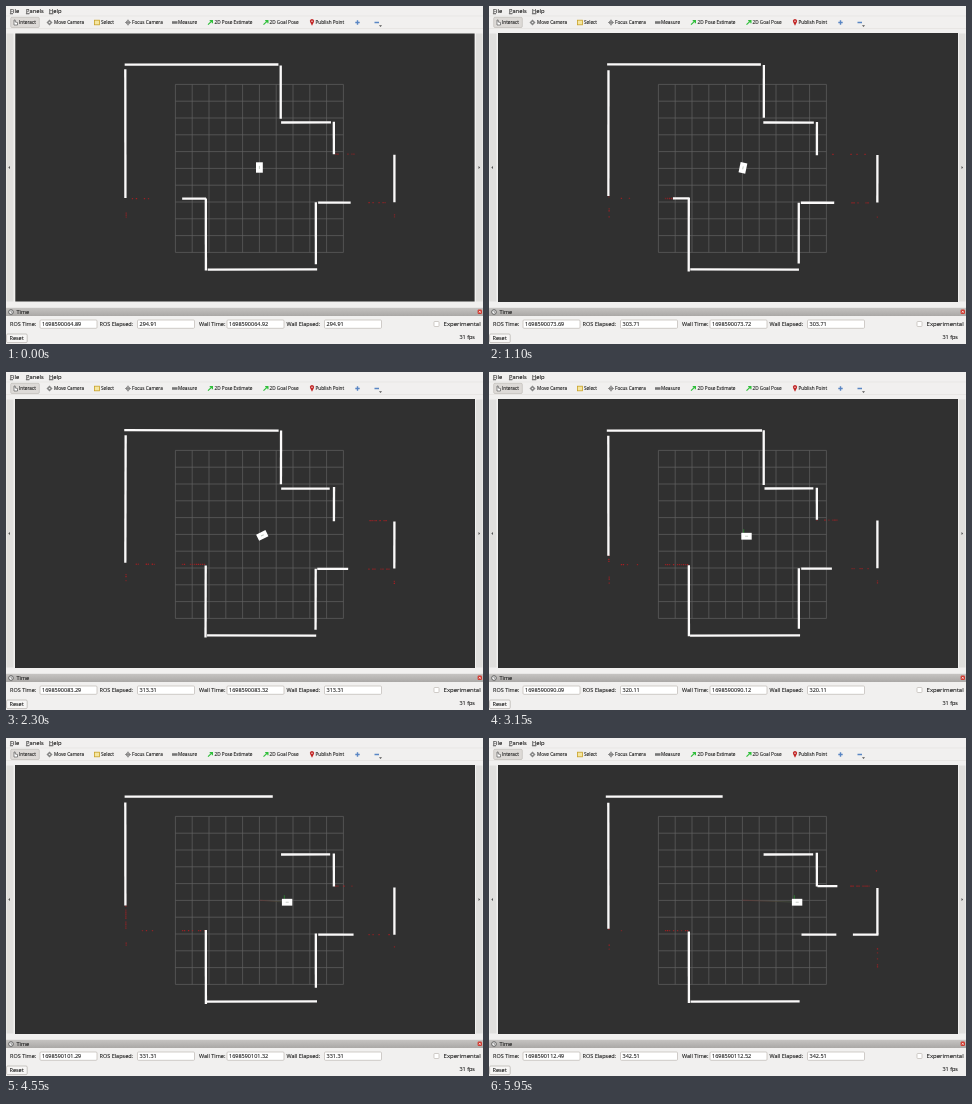
Write an HTML page with a canvas that moves like this. It is 477 by 338 pixels and loops after 6 s.

```html
<!DOCTYPE html>
<html lang="en">
<head>
<meta charset="utf-8">
<title>Robot view</title>
<style>
html, body { margin: 0; width: 477px; height: 338px; overflow: hidden; background: #f1f0ef; }
svg, canvas { position: absolute; left: 0; top: 0; width: 477px; height: 338px; display: block; }
text { font: 5.5px "Open Sans", "Noto Sans", sans-serif; fill: #1c1c1c; stroke: #1c1c1c; stroke-width: .1; }
.menu text { font-size: 5.8px; }
.tools text { font-size: 4.7px; }
.field { fill: #fff; stroke: #bdb8b3; stroke-width: .7; }
.line { fill: none; stroke-width: 1; }
</style>
</head>
<body>
<svg viewBox="0 0 477 338">
  <defs>
    <linearGradient id="bar" x2="0" y2="1">
      <stop offset="0" stop-color="#c6c4c2"/><stop offset="1" stop-color="#aaa8a6"/>
    </linearGradient>
  </defs>
  <rect width="477" height="338" fill="#f1f0ef"/>
  <g class="menu">
    <text x="4" y="6.5"><tspan text-decoration="underline">F</tspan>ile</text>
    <text x="20" y="6.5"><tspan text-decoration="underline">P</tspan>anels</text>
    <text x="43" y="6.5"><tspan text-decoration="underline">H</tspan>elp</text>
  </g>
  <g class="tools">
    <path d="M0 10H477M0 22.5H477" stroke="#e2e0dd" stroke-width=".6"/>
    <rect x="4.7" y="11.3" width="28.6" height="10.2" rx="1.2" fill="#dddad7" stroke="#bbb7b3" stroke-width=".6"/>
    <path d="M8 14V19H11.5V16.5L9.2 16V14Z" fill="#fff" stroke="#444" stroke-width=".6"/>
    <path d="M43.5 13.6L46.5 16.5L43.5 19.4L40.5 16.5Z" fill="#858585"/>
    <circle cx="43.5" cy="16.5" r=".8" fill="#eee"/>
    <rect x="88.5" y="14.2" width="5" height="4.6" fill="#f5e6a0" stroke="#c9a227" stroke-width=".8"/>
    <circle class="line" cx="122" cy="16.5" r="1.7" stroke="#777"/>
    <path class="line" d="M122 13.5V19.5M119 16.5H125" stroke="#777" style="stroke-width:.7"/>
    <path d="M166 15.2H171.5V17.8H166Z" fill="#777"/>
    <path id="arrow" class="line" d="M202 18.6L206 14.9M203.7 14.6H206.4V17.3" stroke="#2fbf3a" style="stroke-width:1.2"/>
    <use href="#arrow" x="55.5"/>
    <path d="M306 19.8L304.2 16.2A2.1 2.1 0 1 1 307.8 16.2Z" fill="#c22626"/>
    <circle cx="306" cy="15.2" r=".7" fill="#f1f0ef"/>
    <path d="M349.3 16.5H353.7M351.5 14.3V18.7M368.5 16.5H373" stroke="#5a86c4" stroke-width="1.4"/>
    <path d="M373 19.3H376L374.5 20.9Z" fill="#555"/>
    <text x="13" y="18.2">Interact</text>
    <text x="48" y="18.2">Move Camera</text>
    <text x="95" y="18.2">Select</text>
    <text x="126" y="18.2">Focus Camera</text>
    <text x="172" y="18.2">Measure</text>
    <text x="208.5" y="18.2">2D Pose Estimate</text>
    <text x="263.5" y="18.2">2D Goal Pose</text>
    <text x="309.5" y="18.2">Publish Point</text>
  </g>
  <path d="M.5 27.5H7.5V295.5H.5ZM470 27.5H476.5V295.5H470Z" fill="#e0dfdd"/>
  <path d="M4 160L2.3 161.5L4 163ZM472.5 160L474.2 161.5L472.5 163Z" fill="#555"/>
  <rect y="301.8" width="477" height="8.2" fill="url(#bar)"/>
  <circle cx="5" cy="306" r="2.3" fill="#fff" stroke="#444" stroke-width=".8"/>
  <path class="line" d="M5 304.5V306.2H6.3" stroke="#444" style="stroke-width:.6"/>
  <text x="10.5" y="308">Time</text>
  <rect x="471.6" y="303.6" width="4.4" height="4.4" rx="1.2" fill="#cf3a30"/>
  <path d="M472.9 304.9L474.7 306.7M474.7 304.9L472.9 306.7" stroke="#fff" stroke-width=".7"/>
  <text x="4" y="320.3">ROS Time:</text>
  <text x="93.5" y="320.3">ROS Elapsed:</text>
  <text x="193" y="320.3">Wall Time:</text>
  <text x="280.5" y="320.3">Wall Elapsed:</text>
  <g class="field">
    <rect x="34" y="314" width="57" height="8.3" rx="1"/>
    <rect x="131.5" y="314" width="57" height="8.3" rx="1"/>
    <rect x="221" y="314" width="57" height="8.3" rx="1"/>
    <rect x="318.5" y="314" width="57" height="8.3" rx="1"/>
    <rect x="428" y="315.5" width="5" height="5" rx=".8"/>
  </g>
  <text id="rosTime" x="36" y="320.3"></text>
  <text id="rosElapsed" x="133.5" y="320.3"></text>
  <text id="wallTime" x="223" y="320.3"></text>
  <text id="wallElapsed" x="320.5" y="320.3"></text>
  <text x="474.7" y="320.3" text-anchor="end" style="font-size:6px">Experimental</text>
  <rect x=".6" y="328" width="20.6" height="8.6" rx="1.2" fill="#f7f6f5" stroke="#b3afab" stroke-width=".7"/>
  <text x="3.5" y="334.4">Reset</text>
  <text x="469" y="333" text-anchor="end">31 fps</text>
</svg>
<canvas id="view"></canvas>
<script>
const LOOP = 6000, STEP = 50;
const HOME = { x: 253.4, y: 161.5 };
const canvas = document.getElementById('view');
const dpr = window.devicePixelRatio || 1;
canvas.width = 477 * dpr;
canvas.height = 338 * dpr;
const ctx = canvas.getContext('2d');

const clamp = (v, lo, hi) => Math.min(hi, Math.max(lo, v));

let seed = 1;
function random() {
  seed = (seed * 16807) % 2147483647;
  return seed / 2147483647;
}

// The robot waits, turns a quarter on the spot, then drives to the right.
function robotAt(n) {
  const turn = clamp((n - 16.5) * 2.15, 0, 90);
  const drive = Math.max(0, n - 66.5) * .964;
  return { turn, x: HOME.x + turn / 22 + drive, y: HOME.y + turn / 33 };
}

function drawGrid() {
  const cell = 16.8, size = cell * 10, left = 169.4, top = 78.4;
  ctx.fillStyle = '#303030';
  ctx.fillRect(9.3, 27.5, 459.3, 268);
  ctx.strokeStyle = '#626262';
  ctx.lineWidth = .7;
  ctx.beginPath();
  for (let d = 0; d < size + 1; d += cell) {
    ctx.moveTo(left + d, top); ctx.lineTo(left + d, top + size);
    ctx.moveTo(left, top + d); ctx.lineTo(left + size, top + d);
  }
  ctx.stroke();
}

// A strongly lit wall; its ends flicker a little.
function wall(x1, y1, x2, y2) {
  const length = Math.hypot(x2 - x1, y2 - y1);
  if (x2 < x1 || y2 < y1 || length < 2) return;
  const a = (random() - .5) * 2 / length, b = 1 + (random() - .5) * 2 / length;
  ctx.beginPath();
  ctx.moveTo(x1 + (x2 - x1) * a, y1 + (y2 - y1) * a);
  ctx.lineTo(x1 + (x2 - x1) * b, y1 + (y2 - y1) * b);
  ctx.stroke();
}

// Weak returns, scattered along a line.
function dots(x1, y1, x2, y2, chance) {
  const length = Math.hypot(x2 - x1, y2 - y1);
  if (x2 < x1 || y2 < y1) return;
  for (let d = 0; d <= length; d += 2) {
    if (random() > chance) continue;
    const u = length ? d / length : 0;
    ctx.fillStyle = `rgba(190,28,32,${.45 + .4 * random()})`;
    ctx.fillRect(x1 + (x2 - x1) * u - .6, y1 + (y2 - y1) * u - .6, 1.3, 1.3);
  }
}

// Walls seen at too flat an angle give only weak returns,
// and the inner corner hides part of the top wall.
function drawRoom({ x, y, turn }) {
  const L = 119.4, T = 58.5, R = 388.4, B = 263.5;
  const cornerX = 274.8, cornerY = 116.5, nookX = 327.9;
  const hallTop = 148.2, hallBottom = 196.7, ledge = 192.5;
  const wellL = 199.8, wellR = 309.8;
  const upper = x + 2.6 * (y - hallTop);
  const lower = x + 2.6 * (hallBottom - y);
  const ledgeFrom = Math.min(wellL, x - (2.5 - .02 * turn) * (ledge - y));
  const shadow = x + (cornerX - x) * (y - T) / (y - cornerY);
  const dim = 23 * Math.sin(Math.PI * clamp((x - HOME.x - 3) / 50, 0, 1)) ** .4;
  const far = Math.max(0, x - 290);

  ctx.save();
  ctx.translate(HOME.x, HOME.y);
  ctx.rotate(.0045 * Math.sin(turn * Math.PI / 90) - .001);
  ctx.translate(-HOME.x, -HOME.y);

  dots(L + 7, ledge, 150, ledge, .35);
  dots(176.5, ledge, ledgeFrom, ledge, .7);
  dots(L + .7, 203, L + .7, 211, .5);
  dots(L + .4, 191 - dim, L + .4, 191, .7);
  dots(Math.max(nookX, upper), hallTop, 349, hallTop, .3);
  dots(362, hallTop, 380, hallTop, far ? .8 : .3);
  if (lower < R) dots(363, hallBottom, 384, hallBottom, .5);
  dots(R, 209, R, 211 + far, .6);
  if (far) dots(R - 1, 133, R - 1, 136, .7);

  ctx.strokeStyle = '#fbfafa';
  ctx.lineWidth = 2.3;
  wall(L - 2 * random(), T, Math.min(272.5, shadow), T);
  wall(L, 64, L, 191 - dim);
  wall(ledgeFrom, ledge, wellL, ledge);
  wall(wellL, 192.7, wellL, 265);
  wall(wellL + 1.8, B, 310.5, B);
  wall(wellR, 196, wellR, Math.min(257.5, y + 3 * (wellR - x)));
  wall(wellR + 2, hallBottom, Math.min(lower, 347.5), hallBottom);
  if (lower > R) wall(364, hallBottom, R + 1, hallBottom);
  wall(R, 149.6, R, hallBottom - .5);
  if (x < cornerX - 1) wall(cornerX, 59, cornerX, 112.5);
  wall(cornerX, cornerY, 324.5, cornerY);
  wall(nookX, 115.5, nookX, hallTop);
  wall(nookX, hallTop, Math.min(349, upper), hallTop);
  ctx.restore();
}

function drawRobot({ x, y, turn }) {
  if (turn === 90) {
    const trail = ctx.createLinearGradient(HOME.x, 0, x + 1, 0);
    trail.addColorStop(0, '#643434');
    trail.addColorStop(1, '#405840');
    ctx.strokeStyle = trail;
    ctx.lineWidth = .7;
    ctx.beginPath();
    ctx.moveTo(HOME.x, HOME.y + .7);
    ctx.lineTo(x, y);
    ctx.stroke();
    ctx.fillStyle = '#2c7a30';
    ctx.fillRect(x - 3.3, y - 7, 1, 4);
  }
  ctx.save();
  ctx.translate(x, y);
  ctx.rotate(turn * Math.PI / 180);
  ctx.fillStyle = '#fff';
  ctx.fillRect(-3.4, -5.2, 6.8, 10.4);
  ctx.fillStyle = '#c4cbc4';
  ctx.fillRect(-.5, -1.6, 1, 3);
  ctx.restore();
}

function show(id, value) {
  document.getElementById(id).textContent = value.toFixed(2);
}

function writeClock(n) {
  const elapsed = 294.912 + .4 * n;
  const ros = 1698589769.98 + elapsed;
  show('rosTime', ros);
  show('rosElapsed', elapsed);
  show('wallTime', ros + .03);
  show('wallElapsed', elapsed);
}

let last = -1;
function tick() {
  const n = Math.floor(performance.now() % LOOP / STEP);
  if (n !== last) {
    last = n;
    seed = 7919 * (n + 1);
    const robot = robotAt(n);
    ctx.setTransform(dpr, 0, 0, dpr, 0, 0);
    drawGrid();
    drawRoom(robot);
    drawRobot(robot);
    writeClock(n);
  }
  requestAnimationFrame(tick);
}
tick();
</script>
</body>
</html>
```
